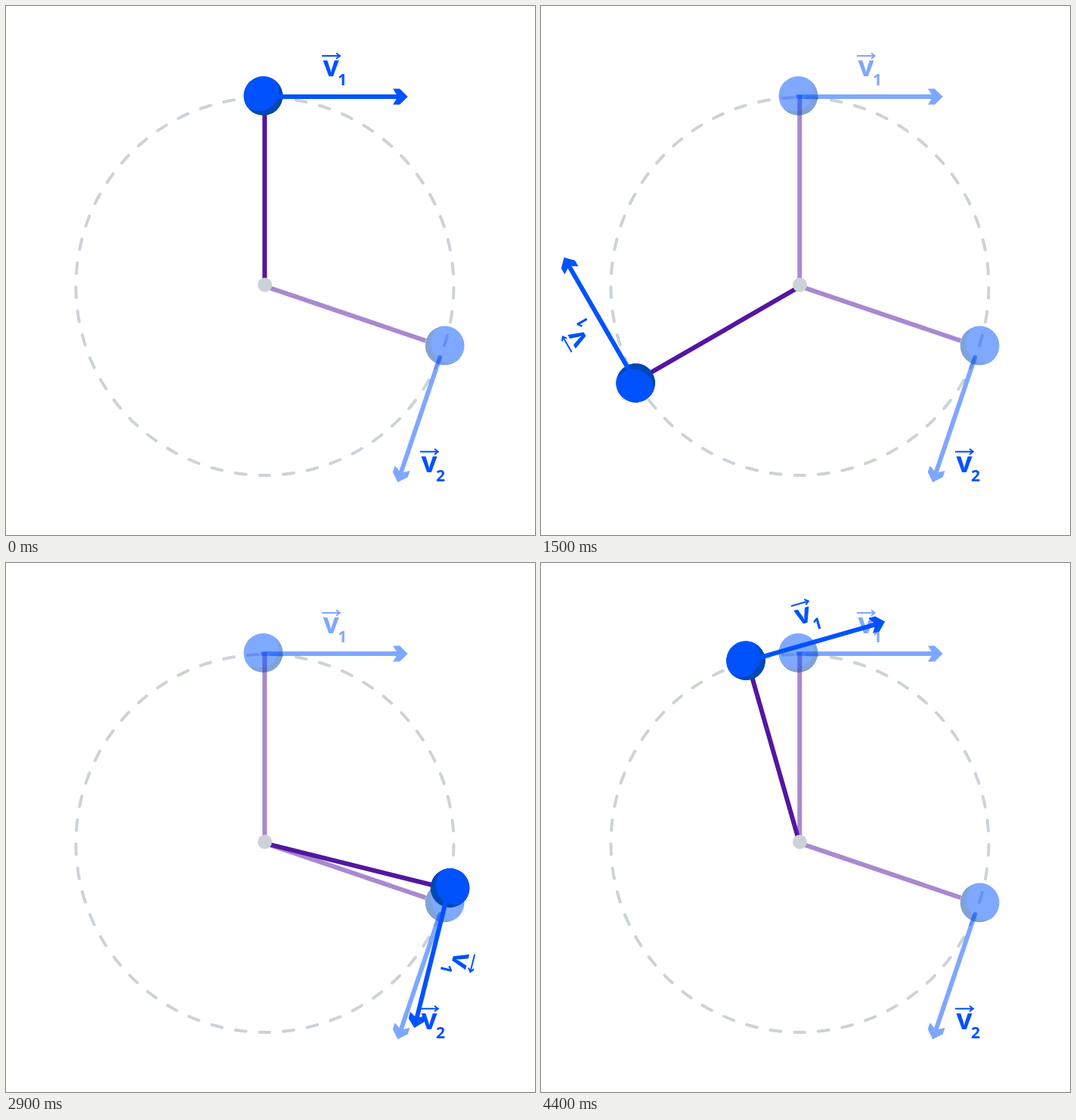
An HTML page for the animation above (4.5 s loop, 700x700 px).

```html
<!DOCTYPE html>
<html lang="en">
<head>
<meta charset="utf-8">
<title>Velocity in circular motion</title>
<style>
  html, body { margin: 0; width: 100%; height: 100%; overflow: hidden; background: #fff; }
  svg { display: block; width: 100vw; height: 100vh; }
  .ring { fill: none; stroke: #ccd3d8; stroke-width: 4; stroke-linecap: round; }
  .rod { stroke: #5416a0; stroke-width: 6; }
  .shaft { stroke: #0052ff; stroke-width: 6; stroke-linecap: round; }
  .blue { fill: #0052ff; }
  .shade { fill: #0048b3; }
  .over { fill: none; stroke: #0052ff; stroke-width: 2; }
  .label { fill: #0052ff; font-family: "Open Sans", "Noto Sans", sans-serif; font-weight: 700; text-anchor: middle; }
  .faded > * { opacity: .5; }
</style>
</head>
<body>
<svg viewBox="0 0 700 700">
  <defs><clipPath id="disc"><circle cx="340.5" cy="119" r="26"/></clipPath></defs>
  <circle class="ring" id="ring" cx="342.5" cy="371" r="250" transform="rotate(90 342.5 371)"/>
  <g id="start" class="faded"></g>
  <g id="later" class="faded" transform="translate(-1.3 -.4) rotate(108.7 342.5 371)"></g>
  <g id="laterLabel" transform="translate(130 523.7)"></g>
  <g id="mover"></g>
  <circle cx="342.5" cy="369" r="9.5" fill="#ccd3d8"/>
</svg>
<script>
  const STEP = 100, STEPS = 45, TURN = 16;
  const DASHES = 49, DASH = 14;
  const el = id => document.getElementById(id);

  // Rod, ball and velocity arrow, drawn at the top of the circle
  const body = (rodEnd, arrowStart) => `
    <line class="rod" x1="342.3" y1="371" x2="342.3" y2="${rodEnd}"/>
    <g clip-path="url(#disc)">
      <circle class="shade" cx="340.5" cy="119" r="26"/>
      <circle class="blue" cx="334.5" cy="112.5" r="26.5"/>
    </g>
    <g>
      <line class="shaft" x1="${arrowStart}" y1="120" x2="521" y2="120"/>
      <path class="blue" d="M512 109.5h9L531.7 120 521 130.5h-9L518.5 120z"/>
    </g>`;

  const label = index => `
    <g class="label">
      <path class="over" d="M418 66H441.5M437 62.3L441.8 66 437 69.7"/>
      <text x="430" y="93" font-size="37">v</text>
      <text x="445" y="105.3" font-size="21">${index}</text>
    </g>`;

  const period = 2 * Math.PI * 250 / DASHES;
  el('ring').style.strokeDasharray = `${DASH} ${period - DASH}`;
  el('ring').style.strokeDashoffset = DASH / 2;

  el('start').innerHTML = body(118, 340) + label(1);
  el('later').innerHTML = body(145, 357);
  el('laterLabel').innerHTML = label(2);
  el('mover').innerHTML = body(118, 340) + label(1);

  const begin = performance.now();
  function draw() {
    const step = Math.floor((performance.now() - begin) / STEP) % STEPS;
    el('mover').setAttribute('transform', `rotate(${step * TURN} 342.5 371)`);
    el('start').setAttribute('visibility', step ? 'visible' : 'hidden');
    requestAnimationFrame(draw);
  }
  draw();
</script>
</body>
</html>
```
